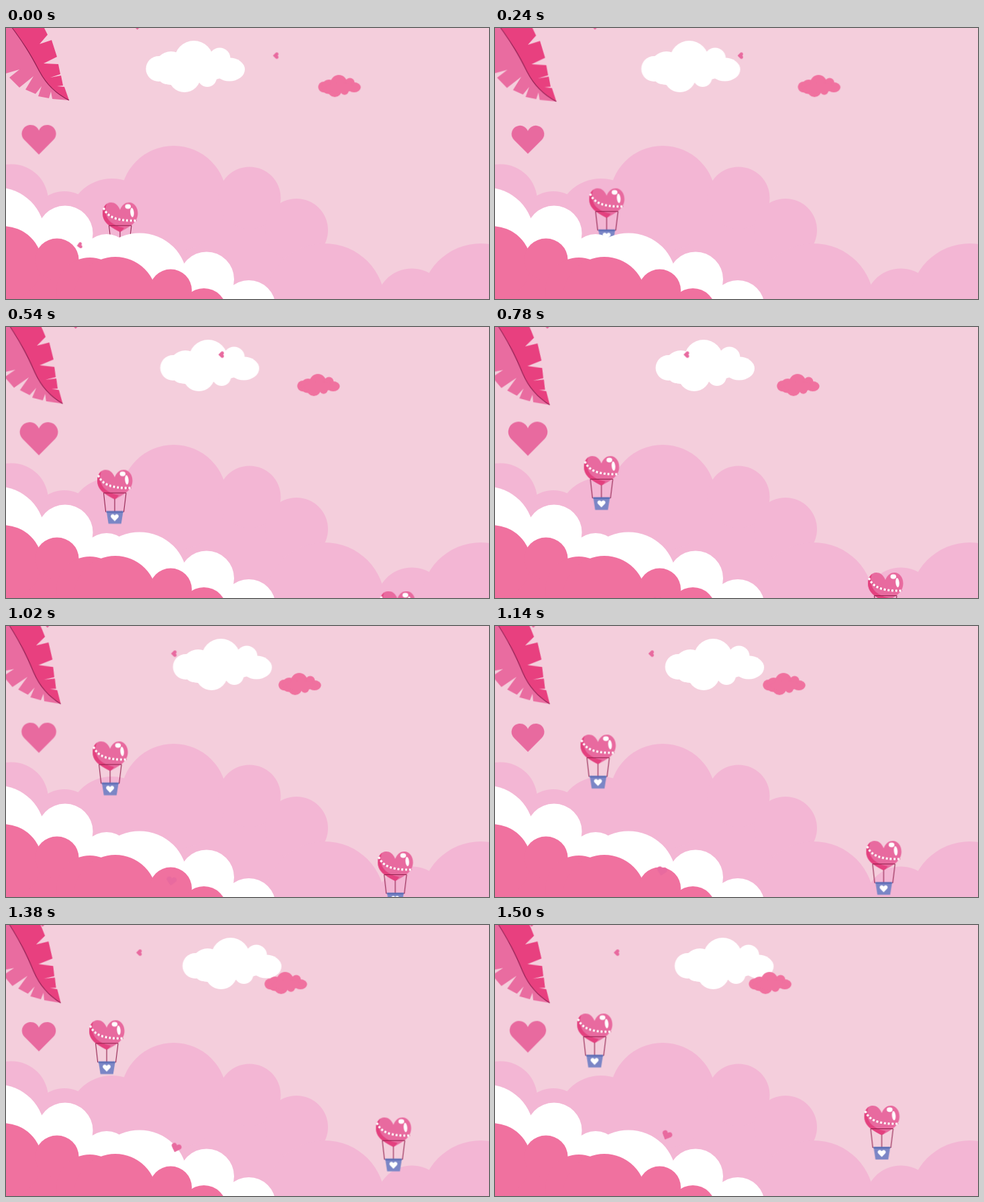
These frames come from a looping animation (720x405 px, 1530 ms). An HTML page without scripts:

```html
<!DOCTYPE html>
<html lang="en">
<head>
<meta charset="utf-8">
<title>Heart balloons</title>
<style>
  html, body { margin: 0; width: 100%; height: 100%; overflow: hidden; background: #f4cedc; }
  svg { display: block; width: 100vw; height: 100vh; }

  .move { animation: move 1530ms linear infinite; }
  @keyframes move {
    from { transform: translate(var(--from)); }
    to { transform: translate(var(--to)); }
  }
  .glide { animation-timing-function: cubic-bezier(.333, .345, .667, .679); }
  .cloud-white { --from: 0px, 0px; --to: 60.5px, 0px; }
  .cloud-pink { --from: 0px, 0px; --to: -88.7px, 0px; }
  .drifter { --from: 402.2px, 41.3px; --to: 177px, 41.3px; }
  .balloon-left { --from: 144px, 260.8px; --to: 122px, 130px; }
  .balloon-right {
    --from: 560.5px, 448.6px; --to: 550.2px, 265.6px;
    animation-timing-function: cubic-bezier(.333, .247, .667, .58);
  }

  .slide { animation: slide 1530ms infinite; }
  @keyframes slide {
    0% { transform: translate(196px, -4px); animation-timing-function: cubic-bezier(.333, .667, .667, 1); }
    86.3%, 100% { transform: translate(54.5px, -4px); }
  }

  .leaf { transform-origin: -11px -32px; animation: sway 1530ms infinite; }
  @keyframes sway {
    0% { transform: rotate(0deg); animation-timing-function: cubic-bezier(.37, 0, .63, 1); }
    52%, 100% { transform: rotate(4.9deg); }
  }

  .pulse { animation: pulse 1530ms cubic-bezier(.364, 0, .636, 1) infinite; }
  @keyframes pulse {
    0% { transform: scale(1.008); animation-timing-function: cubic-bezier(.333, .667, .667, 1); }
    11.76% { transform: scale(.951); }
    45.75% { transform: scale(1.167); }
    79.74% { transform: scale(.951); animation-timing-function: cubic-bezier(.36, 0, .68, .5); }
    100% { transform: scale(1.09); }
  }

  .rise { animation: rise 1530ms linear infinite; }
  @keyframes rise {
    0% { transform: translate(236px, 480px) rotate(0deg); }
    51% { transform: translate(242px, 411px) rotate(4deg); }
    82.35% { transform: translate(251px, 352px) rotate(15deg); }
    100% { transform: translate(256.6px, 310px) rotate(25deg); }
  }

  .vanish { animation: vanish 1530ms linear infinite; }
  @keyframes vanish {
    0% { transform: translate(109.5px, 325px) rotate(80deg) scale(.18); }
    11%, 100% { transform: translate(111px, 310px) rotate(95deg) scale(0); }
  }
</style>
</head>
<body>
<svg viewBox="0 0 720 405" preserveAspectRatio="none">
  <defs>
    <path id="heart" d="M0 22L-21.6 .2A13.1 13.1 0 1 1 0 -13.6A13.1 13.1 0 1 1 21.6 .2Z"/>

    <g id="cloud">
      <circle cx="227.5" cy="61" r="19"/>
      <circle cx="246" cy="60" r="25"/>
      <circle cx="280" cy="48" r="29"/>
      <circle cx="318.5" cy="45.5" r="16"/>
      <ellipse cx="333" cy="62" rx="23" ry="17.5"/>
      <circle cx="240" cy="70" r="14"/>
      <circle cx="266" cy="72" r="24"/>
      <circle cx="300" cy="74" r="14"/>
      <ellipse cx="285" cy="62" rx="50" ry="18"/>
    </g>

    <clipPath id="balloon-clip">
      <path id="balloon-shape" d="M26 11C23 3 17.500 0 12.500 0C5 0 0 7 0 16C0 29 10 36 26 44C42 36 52.500 29 52.500 16C52.500 7 47 0 39.500 0C34.500 0 29 3 26 11Z"/>
    </clipPath>

    <g id="balloon">
      <use href="#balloon-shape" fill="#e86a9f"/>
      <path clip-path="url(#balloon-clip)" fill="#e3417f" d="M8 -1C3 6 3 18 9 26C14 32 21 35.500 32 38L26 46L-2 34V-1Z"/>
      <path d="M2 9.500C8 22 22 28 51 27" fill="none" stroke="#c22a66" stroke-width=".8"/>
      <path d="M2 9.500C8 22 22 28 51 27" fill="none" stroke="#fff" stroke-width="3.6" stroke-linecap="round" stroke-dasharray=".1 5.7"/>
      <ellipse cx="37.8" cy="6" rx="4.3" ry="3.4" fill="#fff"/>
      <ellipse cx="44" cy="15" rx="2.7" ry="7" fill="#fff" transform="rotate(-5 44 15)"/>
      <path d="M9.500 34.500H43M9.500 34.500L12.700 63M43 34.500L39.500 63M26 43.500V63" fill="none" stroke="#8f1d4a" stroke-width="1.1"/>
      <path d="M14 63H38.500L35.700 80.500H16.700Z" fill="#7b86c6"/>
      <path d="M13.500 61.500H38.700V64H13.500Z" fill="#5b6db5"/>
      <use href="#heart" fill="#fff" transform="translate(26 71.500) scale(.235)"/>
    </g>
  </defs>

  <rect width="720" height="405" fill="#f4cedc"/>

  <g class="move cloud-white"><use href="#cloud" fill="#fff"/></g>
  <g class="move cloud-pink">
    <use href="#cloud" fill="#f0719f" transform="translate(375.800 62) scale(.43)"/>
  </g>

  <g fill="#e86a9f">
    <g class="move glide drifter"><use href="#heart" transform="rotate(90) scale(.19)"/></g>
    <g class="slide"><use href="#heart" transform="scale(.3)"/></g>
    <g transform="translate(49 167)"><use class="pulse" href="#heart"/></g>
  </g>

  <g class="leaf">
    <path fill="#e96ca0" d="M-6 -20L-30 -10V60L-4 69L20 62L5 74L20 89L41 72L29 92L44 98.500L53 87L48 102L64 105L67 95L69 106L94 108C72 97 58 81 50 65C42 50 30 25 -6 -20Z"/>
    <path fill="#e8407f" d="M-6 -20H46L57 0L62 10L50 24L68 18L76 43L56 53L78 54L81 69L66 74L82 71L85 86L76 87L87 88L94 108C72 97 58 81 50 65C42 50 30 25 -6 -20Z"/>
    <path fill="none" stroke="#8f1d50" stroke-width="1.2" d="M-6 -20C30 25 42 50 50 65S72 97 94 108"/>
  </g>

  <g fill="#f3b6d4">
    <path d="M0 258L100 260L160 240L250 220L363 240L433 290L480 340L540 405H0Z"/>
    <circle cx="8" cy="258.500" r="55"/>
    <circle cx="87" cy="295" r="51"/>
    <circle cx="158" cy="291" r="66"/>
    <circle cx="250" cy="255" r="79"/>
    <circle cx="363" cy="254" r="46.500"/>
    <circle cx="433" cy="302" r="47"/>
    <circle cx="475" cy="412" r="90"/>
    <circle cx="605" cy="413" r="53.500"/>
    <circle cx="708" cy="412" r="90"/>
  </g>

  <use class="move glide balloon-left" href="#balloon"/>
  <use class="move balloon-right" href="#balloon"/>

  <g fill="#fff">
    <path d="M0 300L90 300L150 330L200 340L300 370L362 405H0Z"/>
    <circle cx="-14" cy="310" r="72"/>
    <circle cx="88" cy="307" r="41.500"/>
    <circle cx="150" cy="346" r="38"/>
    <ellipse cx="199" cy="376" rx="71" ry="69.500"/>
    <circle cx="299" cy="375.500" r="41"/>
    <circle cx="362" cy="417" r="40"/>
  </g>

  <g fill="#f0719f">
    <path d="M0 340L76 340L125 360L163 360L245 390L295 405H0Z"/>
    <ellipse cx="-5" cy="352" rx="58.500" ry="56"/>
    <ellipse cx="76" cy="346" rx="32.500" ry="31.500"/>
    <circle cx="125" cy="393" r="50"/>
    <circle cx="163" cy="404" r="62"/>
    <circle cx="245.500" cy="392" r="31.500"/>
    <circle cx="295" cy="423" r="34"/>
  </g>

  <g fill="#e86a9f">
    <use class="vanish" href="#heart"/>
    <g class="rise"><use href="#heart" transform="scale(.3)"/></g>
  </g>
</svg>
</body>
</html>
```
